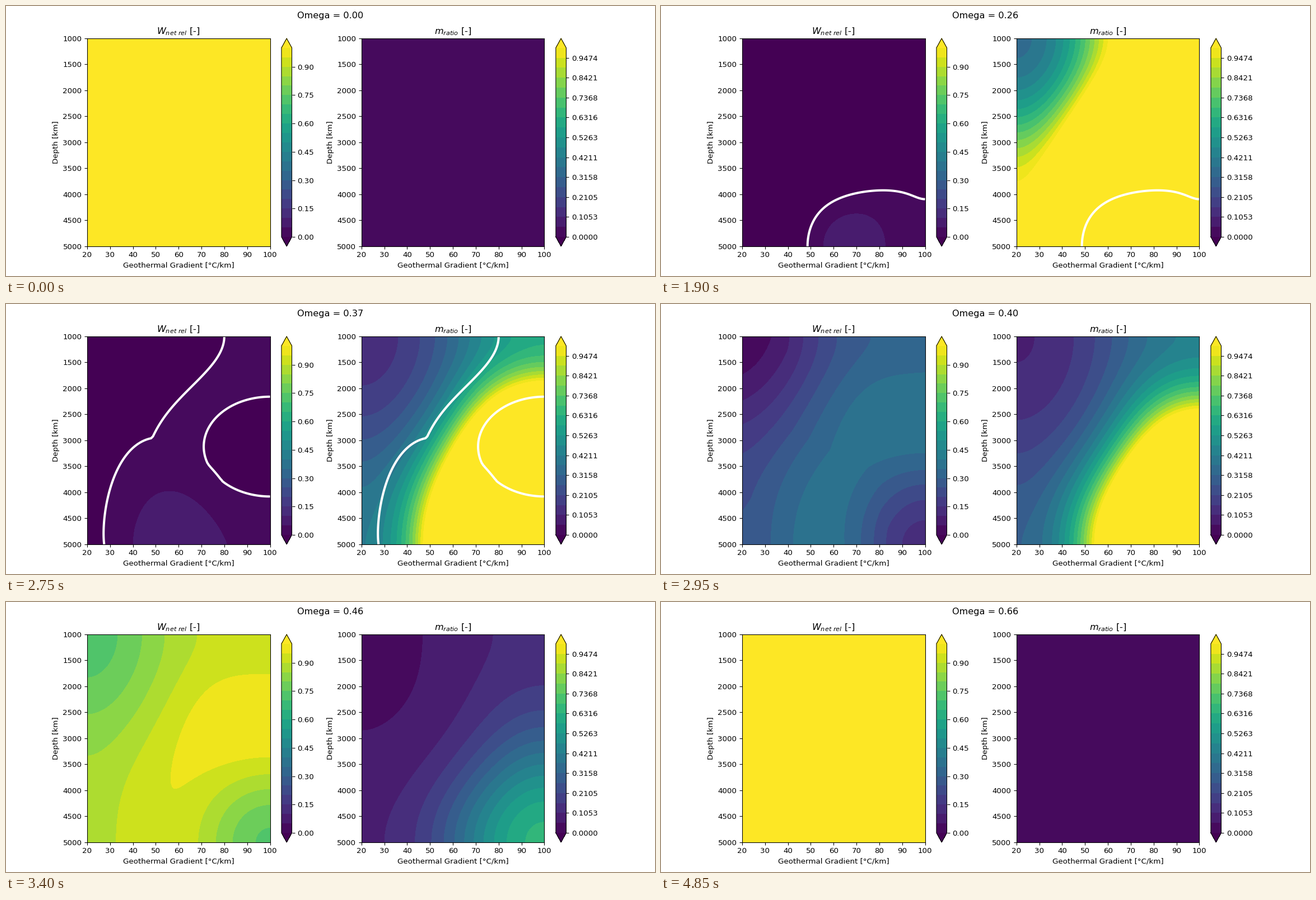
Recreate the animation shown at these times as a matplotlib script. Size 1159 by 483 pixels, loop 4.95 s.

```python
import numpy as np
import matplotlib.pyplot as plt
from matplotlib.animation import FuncAnimation

DPI = 96.6
FRAMES, LAST = 99, 97
OMEGA_STEP = 0.66 / LAST
OMEGA_LIMIT = 0.489           # the mass ratio vanishes here
KEY_STEPS = (26, 47, 55, 63)  # steps at which the fields are described
W_END = 1.15

grad, depth = np.meshgrid(np.linspace(20, 100, 101), np.linspace(1, 5, 101))
v = (depth - 1) / 4


def surface(*rows):
    """Surface through 3x3 key values, level across every edge."""
    c = np.cos(np.pi * np.linspace(0, 1, len(grad)))
    weights = np.array([c * (c + 1) / 2, 1 - c * c, c * (c - 1) / 2])
    return weights.T @ np.array(rows) @ weights


def split_band():
    """Thin positive band between a slanted edge and an ellipse, with a bump."""
    edge = (51.6 + 21.8 * np.cos(np.pi * v) + 3.6 * np.cos(2 * np.pi * v)
            + 3 * np.cos(3 * np.pi * v))
    ellipse = ((grad - 100) / 29) ** 2 + ((depth - 3.12) / .96) ** 2 - 1
    band = .04 * (1 - np.exp((edge - grad) / 30)) * np.tanh(ellipse)
    rise = 5 - depth
    bump = ((grad - 60.7 + 4.6 * rise) / 20.35) ** 2 + (rise / 1.02) ** 1.4
    return np.maximum(band, .08 - .03 * bump)


# Rows run from shallow to deep, columns from low to high gradient.
neg_log_ratio = [
    surface((.18, -.62, -.6), (-.62, -1.42, -1.4), (-.6, -1.4, -1.38)),
    surface((1.7, .47, -.06), (.85, -.33, -1.2), (.36, -.57, -1.5)),
    surface((2.07, 1.08, .48), (1.33, .1, -1.22), (.87, -.68, -1.6)),
    surface((2.54, 1.7, 1.19), (2.01, 1.15, .09), (1.45, .08, -1.1)),
]
power = [
    surface((-.25, -.2, -.1), (-.18, -.17, -.034), (-.217, .07, .008)),
    surface((-.25, -.2, -.1), (-.18, -.165, -.034), (-.158, .072, .008)),
    split_band(),
    surface((.17, .52, .61), (.42, .69, .775), (.53, .66, .21)),
]


def blend(fields, step):
    pos = np.interp(step, KEY_STEPS, range(len(KEY_STEPS)))
    i = min(int(pos), len(fields) - 2)
    return fields[i] + (fields[i + 1] - fields[i]) * (pos - i)


def state(step):
    """Relative net power and mass ratio at one step."""
    omega = step * OMEGA_STEP
    if step == 0 or omega > OMEGA_LIMIT:
        return np.full_like(grad, W_END), np.full_like(grad, .01)
    lead = max(KEY_STEPS[0] - step, 0)
    w, q = blend(power, step), np.exp(blend(neg_log_ratio, step) - .04 * lead)
    if step > KEY_STEPS[-1]:
        s = (OMEGA_LIMIT - omega) / (OMEGA_LIMIT - KEY_STEPS[-1] * OMEGA_STEP)
        w = W_END - (W_END - w) * s
        q = (q + .6) / s - .6
    return w, 1 / q


# The small margin keeps the pixel size from rounding down.
fig, axes = plt.subplots(1, 2, figsize=(1159.01 / DPI, 483.01 / DPI), dpi=DPI)
heading = fig.suptitle("Omega = 0.00")
titles = (r"$W_{net\ rel}$ [-]", r"$m_{ratio}$ [-]")
levels = (np.linspace(0, 1, 21), np.linspace(0, 1, 20))
drawn = []


def paint(step):
    while drawn:
        drawn.pop().remove()
    w, m = state(step)
    for ax, field, lev in zip(axes, (w, m), levels):
        drawn.append(ax.contourf(grad, depth * 1000, field, lev, extend="both"))
    fills = list(drawn)
    if w.min() < 0 < w.max():
        for ax in axes:
            drawn.append(ax.contour(grad, depth * 1000, w, [0],
                                    colors="white", linewidths=3))
    return fills


for ax, fill, title in zip(axes, paint(0), titles):
    fig.colorbar(fill, ax=ax)
    ax.set(title=title, xlabel="Geothermal Gradient [°C/km]",
           ylabel="Depth [km]", xlim=(20, 100), ylim=(5000, 1000),
           xticks=range(20, 101, 10))


def update(frame):
    step = min(frame, LAST)
    heading.set_text(f"Omega = {step * OMEGA_STEP:.2f}")
    paint(step)
    return []


anim = FuncAnimation(fig, update, frames=FRAMES, interval=50,
                     init_func=lambda: [], repeat=True, repeat_delay=0)
plt.show()
```
